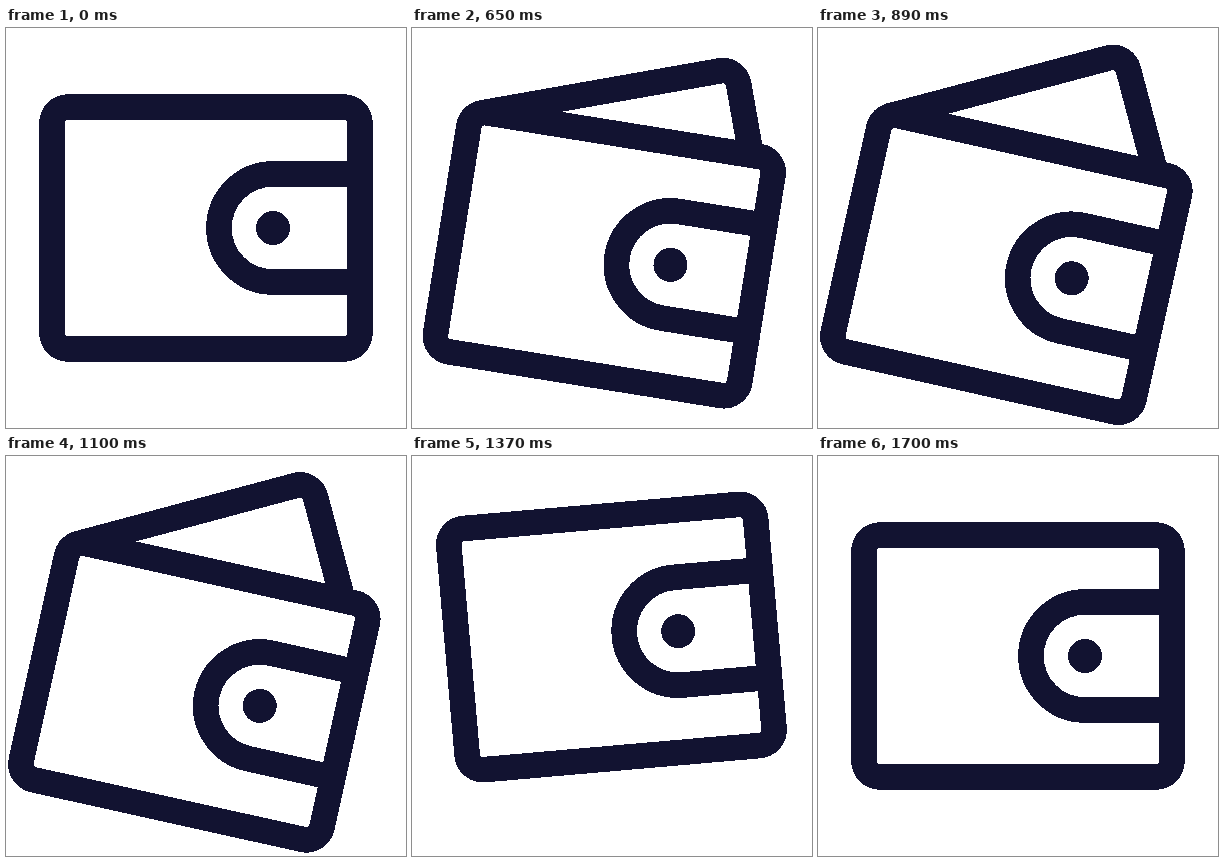
Animation, 400 px wide and 400 px high, one loop 1760 ms. Source, as an HTML page:

```html
<!DOCTYPE html>
<html lang="en">
<head>
<meta charset="utf-8">
<title>Wallet</title>
<style>
  html, body { margin: 0; height: 100%; overflow: hidden; background: #fff; }
  svg { display: block; width: 100%; height: 100%; shape-rendering: crispEdges; }
  path, rect { fill: none; stroke: #121331; stroke-width: 25.6; }
  rect { fill: #fff; }
  circle { fill: #121331; }
</style>
</head>
<body>
<svg viewBox="0 0 400 400">
  <!-- wallet coordinates start at its hinge, near the left edge -->
  <g id="wallet">
    <path id="card"/>
    <rect x="14" y="-88" width="308" height="242" rx="16"/>
    <path d="M322-21H235a54 54 0 0 0 0 108H322"/>
    <circle cx="235" cy="33" r="17"/>
  </g>
</svg>
<script>
const LOOP = 1760, STEP = 30;
const wallet = document.getElementById('wallet');
const card = document.getElementById('card');

const cubic = (a, b, s) => 3 * a * s * (1 - s) ** 2 + 3 * b * s * s * (1 - s) + s ** 3;

function bezier(x1, y1, x2, y2) {
  return p => {
    let lo = 0, hi = 1;
    for (let i = 0; i < 30; i++) {
      const mid = (lo + hi) / 2;
      if (cubic(x1, x2, mid) < p) lo = mid; else hi = mid;
    }
    return cubic(y1, y2, lo);
  };
}

const smooth = bezier(1 / 3, 0, 2 / 3, 1);
const times = [500, 1070, 1370, 1700];

// values at the key times; the opening move has its own ease
function track(values, opening) {
  return t => {
    if (t <= times[0]) return values[0];
    const i = times.findIndex(end => t < end);
    if (i < 0) return values.at(-1);
    const p = (t - times[i - 1]) / (times[i] - times[i - 1]);
    const e = (i === 1 ? opening : smooth)(p);
    return values[i - 1] + (values[i] - values[i - 1]) * e;
  };
}

const swing = bezier(.15, .167, 0, 1);
const lift = bezier(.22, .1, 0, 1);
const x = track([32, 31.5, 29.2, 32], swing);
const y = track([167, 167, 162.8, 167], swing);
const tilt = track([0, 13, -5, 0], swing);
const cardTilt = track([0, -15.4, .5, 0], lift);
const cardSlide = track([1, 52, 6.5, 1], lift);

function draw(now) {
  const t = Math.floor(now % LOOP / 10) * 10;
  const held = t < 530 ? 0 : 530 + Math.floor((t - 530) / STEP) * STEP;
  const angle = tilt(held);
  wallet.setAttribute('transform', `translate(${x(held)} ${y(held)}) rotate(${angle})`);
  // the card turns about the wallet's top left corner
  card.setAttribute('transform', `translate(30 -72) rotate(${cardTilt(held) - angle})`);
  card.setAttribute('d', `M0-16H${276 - cardSlide(held)}a16 16 0 0 1 16 16v120`);
}

const start = performance.now();
function frame() {
  draw(performance.now() - start);
  requestAnimationFrame(frame);
}
draw(0);
requestAnimationFrame(frame);
</script>
</body>
</html>
```
